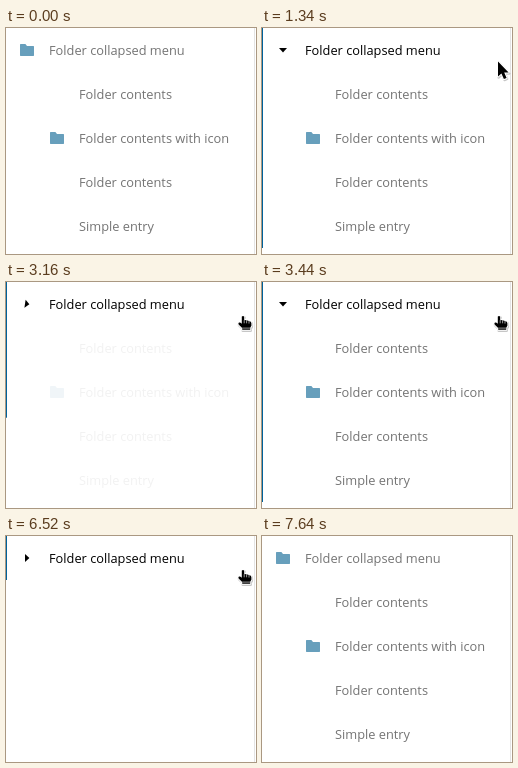
An HTML page that plays this animation: 250x226 px, repeating every 8 s.

```html
<!DOCTYPE html>
<html lang="en">
<head>
<meta charset="utf-8">
<title>Collapsing menu</title>
<style>
html, body { margin: 0; width: 100%; height: 100%; overflow: hidden; background: #fff; }
svg { display: block; width: 100%; height: 100%; }
text { font: 12.8px "Open Sans", sans-serif; }
.outlined { fill: #000; stroke: #fff; stroke-width: 2; stroke-linejoin: round; paint-order: stroke; }
.shadow { fill: #000; stroke: #000; stroke-width: 2.4; stroke-linejoin: round; opacity: .22; }
</style>
</head>
<body>
<svg viewBox="0 0 250 226">
  <defs>
    <path id="folder" d="M.5 0H5.4L7 2H13.5L14 2.5V11.5L13.5 12H.5L0 11.5V.5Z" fill="#679fbc"/>
    <path id="arrowShape" d="M0 0V15L3.4 11.9L5.9 17.6L8.6 16.5L6.2 11H10.6Z"/>
    <path id="handShape" d="M4 .8Q5.2 -.4 6.4 .8V4.4Q7.8 3.6 8.8 4.8Q10.2 4.2 11.2 5.4Q13.6 5.2 13.6 7.4V10L12.4 12V14H4.4V12.2L.8 8.6Q.2 7.2 1.2 6.8Q2.4 6.4 4 8Z"/>
  </defs>
  <rect width="250" height="226" fill="#fff"/>
  <rect x="248" width="1" height="226" fill="#e4e4e4"/>
  <rect id="bar" width="1" fill="#00629b"/>
  <use id="icon" href="#folder" x="14" y="16"/>
  <path id="caret" d="M17 20H25L21 24.4Z"/>
  <text id="title" x="43" y="27">Folder collapsed menu</text>
  <g id="items" fill="#747474">
    <text x="73" y="71">Folder contents</text>
    <use href="#folder" x="44" y="104"/>
    <text x="73" y="115">Folder contents with icon</text>
    <text x="73" y="159">Folder contents</text>
    <text x="73" y="203">Simple entry</text>
  </g>
  <g id="arrow">
    <use class="shadow" href="#arrowShape" x=".6" y="1"/>
    <use class="outlined" href="#arrowShape"/>
  </g>
  <g id="hand">
    <use class="shadow" href="#handShape" x=".5" y="1"/>
    <use class="outlined" href="#handShape"/>
    <path d="M6.4 4.4V7.5M8.8 4.8V7.5M11.2 5.4V7.8M4.4 12.3H12.4" fill="none" stroke="#fff" stroke-width=".6"/>
  </g>
</svg>
<script>
const LOOP = 8000, TICK = 70;
const el = id => document.getElementById(id);
const [bar, icon, caret, title, items, arrow, hand] =
  ["bar", "icon", "caret", "title", "items", "arrow", "hand"].map(el);

// Progress 0..1 in n visible ticks, the first one at start.
const steps = (t, start, n) =>
  Math.max(0, Math.min(1, (Math.floor((t - start) / TICK) + 1) / n));
const smooth = p => (1 - Math.cos(Math.PI * p)) / 2;
const easeOut = p => 1 - (1 - p) ** 3.3;
const show = (node, on) => node.setAttribute("visibility", on ? "visible" : "hidden");
const gray = v => `rgb(${v},${v},${v})`;

function draw(t) {
  const enter = steps(t, 500, 3), leave = steps(t, 7360, 5);
  const hover = enter - leave;
  const active = t >= 500 && t < 7360;
  const opening = steps(t, 3160, 5);
  const closed = smooth(steps(t, 1480, 4)) - smooth(opening) + smooth(steps(t, 5610, 4));
  const shrink = easeOut(steps(t, 1900, 8)) - easeOut(opening) + easeOut(steps(t, 6030, 8));

  bar.setAttribute("height", 220 - 176 * shrink);
  bar.setAttribute("opacity", hover);
  show(icon, !active);
  show(caret, active);
  caret.setAttribute("transform", `rotate(${-90 * closed} 21 22)`);
  title.setAttribute("fill", gray(Math.round(116 * (1 - hover))));
  items.setAttribute("opacity", 1 - closed + smooth(leave));

  const away = t < 1340 ? 2 + 6 * (1 - enter) : 0;
  show(arrow, t >= 500 && t < 1410);
  show(hand, t >= 1410 && t < 7360);
  arrow.setAttribute("transform", `translate(${236 + away} ${33.5 + away})`);
  hand.setAttribute("transform", "translate(231.8 33.8)");
}

function frame(now) {
  draw(now % LOOP);
  requestAnimationFrame(frame);
}
draw(0);
requestAnimationFrame(frame);
</script>
</body>
</html>
```
